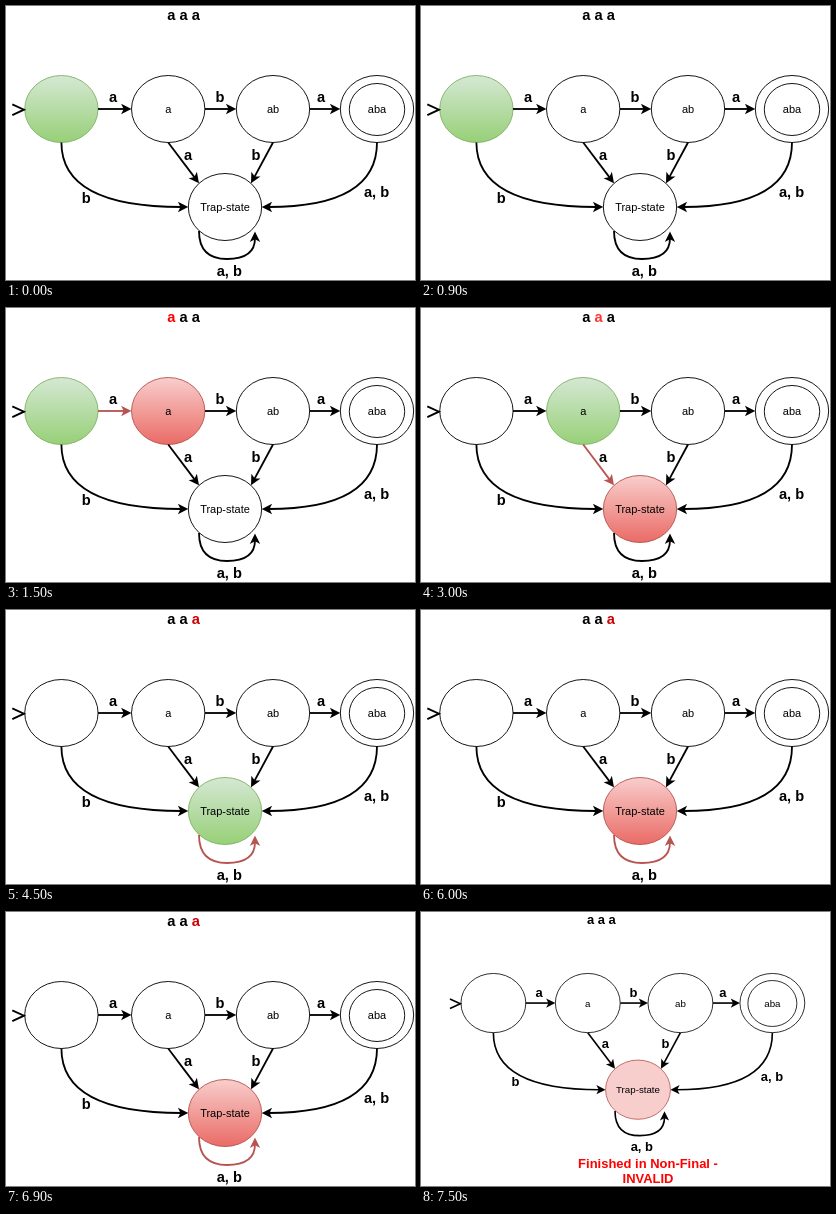
Recreate the animation shown at these times as an HTML page with a canvas. Size 409 by 274 pixels, loop 9 s.

```html
<!DOCTYPE html>
<html lang="en">
<head>
<meta charset="utf-8">
<title>Finite automaton</title>
<style>
  html, body { margin: 0; width: 100%; height: 100%; overflow: hidden; background: #fff; }
  canvas { display: block; width: 409px; height: 274px; }
</style>
</head>
<body>
<canvas id="stage"></canvas>
<script>
const W = 409, H = 274, STEP = 1500;
const canvas = document.getElementById('stage');
const ctx = canvas.getContext('2d');
const dpr = window.devicePixelRatio || 1;
canvas.width = W * dpr;
canvas.height = H * dpr;

const BLACK = '#000', RED_LINE = '#b85450';
const FONT = '"Liberation Sans", Arial, sans-serif';
const THIN = 0.917, THICK = 1.83;
const RX = 36.67, RY = 33.5;

const STYLES = {
  plain: { fill: ['#fff', '#fff'], line: BLACK },
  green: { fill: ['#d5e8d4', '#97d077'], line: '#82b366' },
  red: { fill: ['#f8cecc', '#ea6b66'], line: RED_LINE },
  pink: { fill: ['#f8cecc', '#f8cecc'], line: RED_LINE }
};

const NODES = {
  start: { x: 55.4, y: 103, label: '' },
  a: { x: 162.2, y: 103, label: 'a' },
  ab: { x: 267, y: 103, label: 'ab' },
  aba: { x: 371, y: 103, label: 'aba', final: true },
  trap: { x: 219, y: 201, label: 'Trap-state' }
};

// Each edge: start, optional control points, end; then its label.
const EDGES = {
  startA: { pts: [[92, 103], [125.5, 103]], text: ['a', 107, 96.3] },
  aAb: { pts: [[199, 103], [230.3, 103]], text: ['b', 214, 96] },
  abAba: { pts: [[303.7, 103], [334.3, 103]], text: ['a', 315, 96.3] },
  aTrap: { pts: [[162.2, 136.5], [193, 177.3]], text: ['a', 182, 154] },
  abTrap: { pts: [[267, 136.5], [245, 177.3]], text: ['b', 250, 154] },
  startTrap: { pts: [[55.4, 136.5], [55.4, 201], [182.3, 201]], text: ['b', 80.3, 197] },
  abaTrap: { pts: [[371, 136.5], [371, 201], [255.7, 201]], text: ['a, b', 370.5, 191] },
  trapLoop: { pts: [[193, 225], [193, 253], [249, 253], [249, 225.5]], text: ['a, b', 223.3, 270] }
};

const STEPS = [
  { nodes: { start: 'green' } },
  { nodes: { start: 'green', a: 'red' }, edge: 'startA', letter: 0, ink: '#ff0000' },
  { nodes: { a: 'green', trap: 'red' }, edge: 'aTrap', letter: 1, ink: '#ff3333' },
  { nodes: { trap: 'green' }, edge: 'trapLoop', letter: 2, ink: '#cc0000' },
  { nodes: { trap: 'red' }, edge: 'trapLoop', letter: 2, ink: '#cc0000' },
  { nodes: { trap: 'pink' }, verdict: ['Finished in Non-Final -', 'INVALID'] }
];

function write(str, x, y, size, color = BLACK, weight = 'bold', align = 'center') {
  ctx.font = `${weight} ${size}px ${FONT}`;
  ctx.textAlign = align;
  ctx.fillStyle = color;
  ctx.fillText(str, x, y);
}

function oval(x, y, rx, ry) {
  ctx.beginPath();
  ctx.ellipse(x, y, rx, ry, 0, 0, Math.PI * 2);
}

function drawNode({ x, y, label, final }, { fill, line }) {
  const shade = ctx.createLinearGradient(0, y - RY, 0, y + RY);
  fill.forEach((color, i) => shade.addColorStop(i, color));
  ctx.lineWidth = THIN;
  ctx.strokeStyle = line;
  ctx.fillStyle = shade;
  oval(x, y, RX, RY);
  ctx.fill();
  ctx.stroke();
  if (final) {
    oval(x, y + 0.5, 27.7, 26);
    ctx.stroke();
  }
  write(label, x, y + 4, 11, BLACK, 'normal');
}

function drawEdge({ pts, text }, color) {
  const [px, py] = pts[pts.length - 2];
  const [ex, ey] = pts[pts.length - 1];
  const len = Math.hypot(ex - px, ey - py);
  const ux = (ex - px) / len, uy = (ey - py) / len;
  const size = 6.3;
  // Point at a distance behind the tip and to one side of the edge.
  const at = (back, side) => [
    ex - ux * (back + 2.05) - uy * side,
    ey - uy * (back + 2.05) + ux * side
  ];
  const notch = at(size * 0.75, 0);

  ctx.lineWidth = THICK;
  ctx.strokeStyle = ctx.fillStyle = color;
  ctx.beginPath();
  ctx.moveTo(...pts[0]);
  if (pts.length === 2) {
    ctx.lineTo(...notch);
  } else {
    const controls = pts.slice(1, -1);
    controls.forEach((c, i) => {
      const next = controls[i + 1];
      const end = next ? [(c[0] + next[0]) / 2, (c[1] + next[1]) / 2] : notch;
      ctx.quadraticCurveTo(...c, ...end);
    });
  }
  ctx.stroke();

  ctx.beginPath();
  ctx.moveTo(...at(0, 0));
  ctx.lineTo(...at(size, size / 2));
  ctx.lineTo(...notch);
  ctx.lineTo(...at(size, -size / 2));
  ctx.closePath();
  ctx.fill();
  ctx.stroke();
  write(...text, 14.67);
}

function drawEntry() {
  ctx.lineWidth = THICK;
  ctx.strokeStyle = BLACK;
  ctx.beginPath();
  ctx.moveTo(6.3, 98.3);
  ctx.lineTo(18, 103.7);
  ctx.lineTo(6.3, 109.1);
  ctx.stroke();
}

function drawInput({ letter, ink }) {
  for (let i = 0; i < 3; i++) {
    write('a', 161.3 + i * 12.23, 14, 14.67, i === letter ? ink : BLACK, 'bold', 'left');
  }
}

function draw(now) {
  const step = STEPS[Math.floor(now / STEP) % STEPS.length];
  ctx.setTransform(dpr, 0, 0, dpr, 0, 0);
  ctx.fillStyle = '#fff';
  ctx.fillRect(0, 0, W, H);

  // The diagram shrinks to make room for the verdict.
  if (step.verdict) {
    step.verdict.forEach((line, i) => write(line, 227, 256 + i * 15, 12.97, '#ff0000'));
    ctx.translate(23.4, 0);
    ctx.scale(0.884, 0.884);
  }
  drawInput(step);
  for (const id in NODES) drawNode(NODES[id], STYLES[step.nodes[id] || 'plain']);
  drawEntry();
  for (const id in EDGES) drawEdge(EDGES[id], id === step.edge ? RED_LINE : BLACK);
}

const begin = performance.now();
function tick() {
  draw(performance.now() - begin);
  requestAnimationFrame(tick);
}
tick();
</script>
</body>
</html>
```
